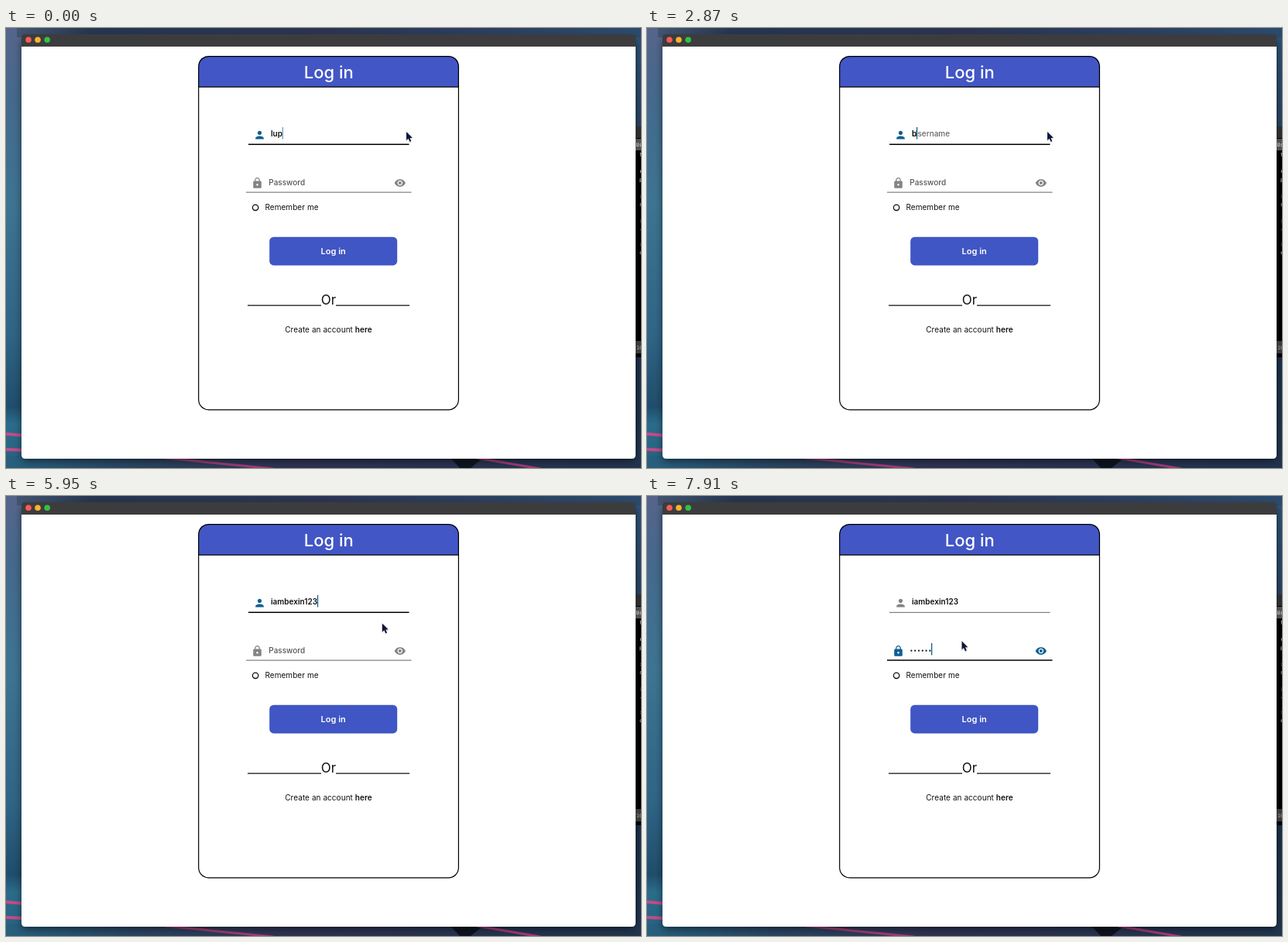
An HTML page that plays this animation: 820 px wide and 568 px high, repeating every 8000 ms.

```html
<!DOCTYPE html>
<html lang="en">
<head>
<meta charset="utf-8">
<title>Log in form</title>
<style>
  html, body { margin: 0; width: 100%; height: 100%; overflow: hidden; background: #24425a; }
  svg { display: block; width: 820px; height: 568px; }
  text { font: 500 10px Inter, Roboto, sans-serif; white-space: pre; }
  .mid { text-anchor: middle; }
  .hint { fill: #555; }
  .label { font-weight: 400; fill: #111; letter-spacing: .06px; }
  .side text { font: 6.5px "DejaVu Sans Mono", monospace; fill: #eee; }
</style>
</head>
<body>
<svg viewBox="0 0 820 568">
  <defs>
    <linearGradient id="wall" x2="0" y2="1">
      <stop offset="0" stop-color="#56648a"/>
      <stop offset=".16" stop-color="#44698c"/>
      <stop offset=".4" stop-color="#3d7491"/>
      <stop offset=".7" stop-color="#2f6484"/>
      <stop offset=".86" stop-color="#204d6c"/>
      <stop offset=".9" stop-color="#2b6c8b"/>
      <stop offset="1" stop-color="#27607e"/>
    </linearGradient>
    <linearGradient id="top">
      <stop offset="0" stop-color="#42546f"/>
      <stop offset=".12" stop-color="#26364f"/>
      <stop offset=".5" stop-color="#2b3553"/>
      <stop offset="1" stop-color="#2c4a6c"/>
    </linearGradient>
    <linearGradient id="floor">
      <stop offset="0" stop-color="#27607e"/>
      <stop offset=".2" stop-color="#2a4561"/>
      <stop offset=".45" stop-color="#2f3352"/>
      <stop offset="1" stop-color="#22354f"/>
    </linearGradient>
    <linearGradient id="right" x2="0" y2="1">
      <stop offset="0" stop-color="#2f5478"/>
      <stop offset=".2" stop-color="#294563"/>
      <stop offset=".75" stop-color="#1c3048"/>
      <stop offset="1" stop-color="#22354f"/>
    </linearGradient>
    <filter id="shade" x="-10%" y="-10%" width="120%" height="120%">
      <feGaussianBlur stdDeviation="5"/>
    </filter>
    <filter id="soft" x="-50%" y="-50%" width="200%" height="200%">
      <feDropShadow dx="0" dy=".8" stdDeviation=".8" flood-opacity=".3"/>
    </filter>
  </defs>

  <!-- desktop -->
  <path fill="url(#wall)" d="M0 0H30V568H0Z"/>
  <path fill="url(#right)" d="M800 0H820V568H800Z"/>
  <path fill="url(#top)" d="M14 0H820V12H14Z"/>
  <path fill="url(#floor)" d="M0 552H820V568H0Z"/>
  <path fill="#0e1420" d="M574 555H616L600 568H586Z"/>
  <path stroke="#a03d74" stroke-width="3" fill="none" d="M205 555L345 569M608 555L690 569"/>
  <path stroke="#c24c88" stroke-width="4" fill="none" d="M0 524L22 526M0 544L22 545"/>
  <rect x="20" y="14" width="793" height="545" rx="7" opacity=".5" filter="url(#shade)"/>

  <!-- window behind -->
  <g class="side">
    <path d="M806 127H820V425H806Z"/>
    <path fill="#2c2d2f" d="M806 127H820V142H806Z"/>
    <path fill="#505154" d="M806 143H820V158H806Z"/>
    <path fill="#3a3b3d" d="M806 404H820V420H806Z"/>
    <text x="813.5" y="153">Us</text>
    <g id="lines"></g>
    <text x="814" y="415" style="fill:#aaa">10</text>
  </g>

  <!-- main window -->
  <path fill="#fff" d="M20 20H813V551Q813 556 808 556H25Q20 556 20 551Z"/>
  <path fill="#3c3c3e" d="M20 24V13Q20 8 25 8H808Q813 8 813 13V24Z"/>
  <circle cx="29" cy="15.3" r="3.8" fill="#fb5b54"/>
  <circle cx="41" cy="15.3" r="3.8" fill="#f8b32c"/>
  <circle cx="53.2" cy="15.3" r="3.8" fill="#32c146"/>

  <!-- card -->
  <path fill="#4256c5" d="M248.7 76V49.7Q248.7 36.7 261.7 36.7H571.4Q584.4 36.7 584.4 49.7V76Z"/>
  <rect x="248.7" y="36.7" width="335.7" height="456.100" rx="13" fill="none" stroke="#000" stroke-width="1.2"/>
  <path d="M249 76.200H584.400" stroke="#000" stroke-width="1.2"/>
  <text class="mid" x="416.7" y="64.700" fill="#fff" style="font-size:22px">Log in</text>

  <g id="userField">
    <path class="icon" transform="translate(319.6 130.2) scale(.66)"
      d="M12 12c2.2 0 4-1.8 4-4s-1.8-4-4-4-4 1.8-4 4 1.8 4 4 4zm0 2c-2.7 0-8 1.3-8 4v2h16v-2c0-2.7-5.3-4-8-4z"/>
    <path class="rule" d="M313 150.3H520.5"/>
    <text class="hint" x="342" y="140.3">Username</text>
    <text id="typed" x="342" y="140.3" fill="#111" style="font-weight:600"></text>
  </g>

  <g id="passField">
    <path class="icon" transform="translate(316.6 192.3) scale(.66)"
      d="M18 8h-1V6c0-2.8-2.2-5-5-5S7 3.2 7 6v2H6c-1.1 0-2 .9-2 2v10c0 1.1.9 2 2 2h12c1.1 0 2-.9 2-2V10c0-1.1-.9-2-2-2zm-6 9c-1.1 0-2-.9-2-2s.9-2 2-2 2 .9 2 2-.9 2-2 2zm3.1-9H8.9V6c0-1.7 1.4-3.1 3.1-3.1s3.1 1.4 3.1 3.1v2z"/>
    <path class="icon" transform="translate(501 192.2) scale(.65)"
      d="M12 4.5C7 4.5 2.7 7.6 1 12c1.7 4.4 6 7.5 11 7.5s9.3-3.1 11-7.5c-1.7-4.4-6-7.5-11-7.5zM12 17c-2.8 0-5-2.2-5-5s2.2-5 5-5 5 2.2 5 5-2.2 5-5 5zm0-8c-1.7 0-3 1.3-3 3s1.3 3 3 3 3-1.3 3-3-1.3-3-3-3z"/>
    <path class="rule" d="M310 212.1H523.5"/>
    <text class="hint" x="339.3" y="202.5">Password</text>
    <g id="dots" fill="#111"></g>
  </g>
  <rect id="caret" width="1.3" height="15.5" fill="#125f92"/>

  <circle cx="322.1" cy="231.8" r="3.7" fill="none" stroke="#111" stroke-width="1.3"/>
  <text class="label" x="334.4" y="235.3">Remember me</text>

  <rect x="340.2" y="269.7" width="165" height="36.7" rx="5.5" fill="#4056c4"/>
  <text class="mid" x="422.7" y="292.3" fill="#fff" style="font-size:11px;font-weight:600">Log in</text>

  <path d="M312 358.2H407M426 358.2H521" stroke="#111" stroke-width="1.3"/>
  <text class="mid label" x="416.5" y="357" style="font-size:17px">Or</text>
  <text class="mid label" x="416.5" y="392.5">Create an account <tspan style="font-weight:600">here</tspan></text>

  <g id="mouse">
    <path transform="scale(.9)" d="M0 0V12.3L2.8 9.7L4.9 14.3L7 13.4L5 8.9L8.7 8.7Z"
      fill="#0b1238" stroke="#fff" paint-order="stroke" filter="url(#soft)"/>
  </g>
</svg>

<script>
const LOOP = 8000, STEP = 70, FOCUS = 6230;
const $ = s => document.querySelector(s);

// [time, text] - held until the next entry
const keys = [
  [0, 'lup'], [980, 'lu'], [1120, 'l'], [1260, ''],
  [2870, 'b'], [3010, ''], [3150, 'i'], [3290, 'ia'], [3430, 'iam'],
  [3640, 'iamb'], [3710, 'iambe'], [3920, 'iambex'], [4130, 'iambexi'],
  [5250, 'iambexin'], [5390, 'iambexin1'], [5460, 'iambexin12'], [5600, 'iambexin123']
];
const dotTimes = [7280, 7420, 7490, 7630, 7770, 7910];

// [time, value...] - linear in between
const blink = [
  [0, .6], [140, 1], [350, 1], [630, 0], [840, 0], [980, 1], [1540, 1], [1820, 0],
  [1960, 0], [2310, 1], [2520, 1], [2800, 0], [2870, 1], [4410, 1], [4620, 0],
  [4830, 0], [5040, 1], [6160, 1], [6230, 0], [6580, 0], [6720, 1], [6930, 1],
  [7140, 0], [7280, 1], [8000, 1]
];
const userHint = [
  [0, 0], [1190, 0], [1400, 1], [2800, 1], [2870, .9], [3010, .3], [3080, .6], [3290, 0]
];
const passHint = [[0, 1], [7210, 1], [7280, .8], [7420, 0]];
const path = [
  [0, 517, 134], [5670, 517, 134], [6020, 478, 172], [6230, 433, 203.3],
  [6580, 433, 203.3], [7000, 406.5, 187.3]
];

const held = (table, t) => table.filter(k => k[0] <= t).pop()[1];

function ramp(table, t) {
  const i = table.findIndex(k => k[0] > t);
  if (i < 0) return table[table.length - 1].slice(1);
  const [a, b] = [table[i - 1], table[i]];
  const p = (t - a[0]) / (b[0] - a[0]);
  return a.slice(1).map((v, n) => v + (b[n + 1] - v) * p);
}

function add(parent, tag, attrs, text = '') {
  const el = document.createElementNS('http://www.w3.org/2000/svg', tag);
  for (const k in attrs) el.setAttribute(k, attrs[k]);
  el.textContent = text;
  parent.append(el);
  return el;
}

[['l', 166], ['r', 187], ['p', 198], [':', 219], ['s', 230], [':', 251], ['-', 262], [':', 281], ['c', 292]]
  .forEach(([ch, y]) => add($('#lines'), 'text', { x: 818, y }, ch));
const dots = dotTimes.map((_, i) => add($('#dots'), 'circle', { cx: 341.4 + i * 4.8, cy: 199.7, r: 1.1 }));

function paintField(id, p, hint) {
  const field = $(id);
  const mix = (a, b) => Math.round(a + (b - a) * p);
  field.querySelectorAll('.icon').forEach(el =>
    el.setAttribute('fill', `rgb(${mix(132, 16)},${mix(132, 94)},${mix(132, 148)})`));
  const rule = field.querySelector('.rule');
  rule.setAttribute('stroke', `rgb(${mix(85, 0)},${mix(85, 0)},${mix(85, 0)})`);
  rule.setAttribute('stroke-width', .9 + .6 * p);
  field.querySelector('.hint').setAttribute('opacity', hint);
}

function draw(time) {
  const t = Math.floor((time % LOOP) / STEP + 1e-6) * STEP;
  const inPass = t >= FOCUS;
  const shift = Math.min(1, Math.max(0, (t - FOCUS + STEP) / 140));
  paintField('#userField', 1 - shift, ramp(userHint, t)[0]);
  paintField('#passField', shift, ramp(passHint, t)[0]);

  const typed = $('#typed');
  typed.textContent = held(keys, t);
  const count = dotTimes.filter(d => d <= t).length;
  dots.forEach((d, i) => d.setAttribute('opacity', i < count ? 1 : 0));

  const caret = $('#caret');
  const width = typed.textContent ? typed.getComputedTextLength() : 0;
  caret.setAttribute('x', inPass ? 338.5 + count * 4.75 : 341.7 + width);
  caret.setAttribute('y', inPass ? 190 : 128);
  caret.setAttribute('opacity', ramp(blink, t)[0]);

  $('#mouse').setAttribute('transform', `translate(${ramp(path, t)})`);
}

const start = performance.now();
(function tick() {
  draw(performance.now() - start);
  requestAnimationFrame(tick);
})();
</script>
</body>
</html>
```
